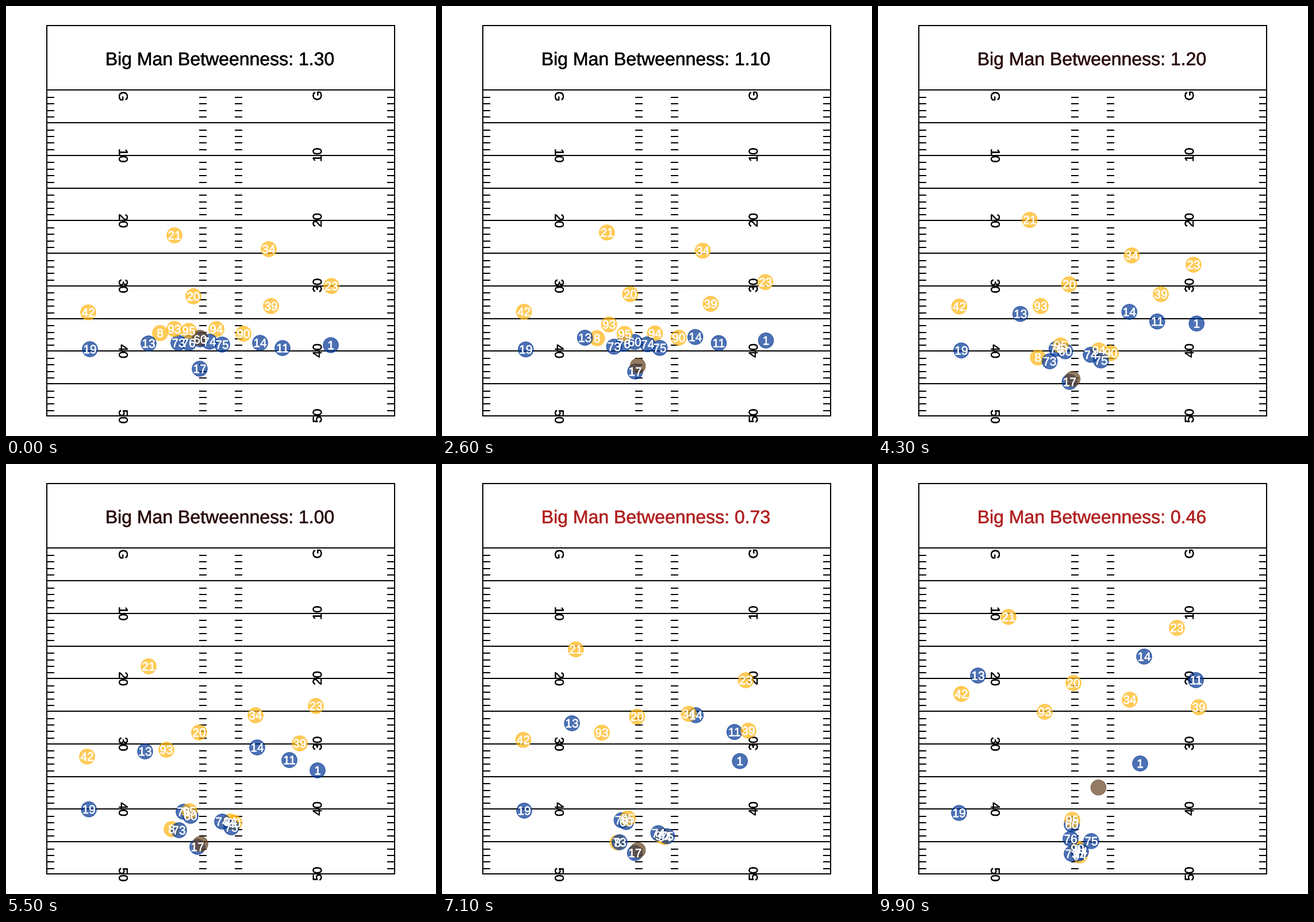
Write a matplotlib script that moves like this. It is 748x748 px and loops after 10 s.

```python
import numpy as np
import matplotlib.pyplot as plt
from matplotlib.animation import FuncAnimation
from matplotlib.patches import Circle, Rectangle
from matplotlib.patheffects import withStroke

SIZE, DPI, FRAMES = 748, 100, 100
PT = 72 / DPI
GOLD, BLUE, BROWN, RED = "#FFB612", "#003594", "#654321", "#B22222"
LEFT, RIGHT, TOP, BOTTOM = 71, 676, 34, 713
GOAL, YARD = 146.4, 11.35
SNAP, CATCH, MIDWAY, THROW = 16, 27, 55, 89

plt.rcParams["font.family"] = "Liberation Sans"
fig = plt.figure(figsize=(SIZE / DPI, SIZE / DPI), dpi=DPI, facecolor="white")
ax = fig.add_axes([0, 0, 1, 1])
ax.set_xlim(0, SIZE)
ax.set_ylim(SIZE, 0)
ax.axis("off")


def label(x, y, text, px, **style):
    return ax.text(x, y, text, fontsize=px * PT, ha="center", va="baseline",
                   rotation_mode="anchor",
                   path_effects=[withStroke(linewidth=0.5 * PT)], **style)


def draw_field():
    line = dict(colors="black", linewidth=2 * PT, snap=True, zorder=1)
    ax.add_patch(Rectangle((LEFT, TOP), RIGHT - LEFT, BOTTOM - TOP, fill=False,
                           ec="black", lw=2 * PT, snap=True, zorder=1))
    hashes = np.array([LEFT, 336, 398, RIGHT - 13])
    for yard in range(50):
        y = GOAL + yard * YARD
        if yard % 5 == 0:
            ax.hlines(y, LEFT, RIGHT, **line)
        else:
            ax.hlines([y + 1.2] * 4, hashes, hashes + 13, **line)
    for yard in range(0, 51, 10):
        text = str(yard) if yard else "G"
        y = GOAL + yard * YARD + (0 if yard else 10.5)
        label(196.5, y + 0.3, text, 22, rotation=270, zorder=2)
        label(549, y - 1, text, 22, rotation=90, zorder=2)


frames = np.arange(FRAMES)
since = np.maximum(frames - SNAP, 0)
# Ground covered since the snap: get up to speed, then run steadily
run = since - 14 * (1 - np.exp(-since / 14))
run = (run / run[-1])[:, None]


def route(start, end, via=None):
    """Curve from start to end that passes via at MIDWAY."""
    start, end = np.array(start, float), np.array(end, float)
    path = start + (end - start) * run
    if via:
        path += (via - path[MIDWAY]) * run * (1 - run) / (
            run[MIDWAY] * (1 - run[MIDWAY]))
    return path


movers = []


def add(name, color, path):
    z = 3 + 0.01 * len(movers)
    dot = ax.add_patch(Circle(path[0], 13.3, fc=color, ec=color, alpha=0.7,
                              lw=PT, zorder=z))
    text = label(*path[0], name, 21, color="white", zorder=z + 2)
    movers.append((dot, text, path))
    return path


def defend(number, *points):
    return add(str(number), GOLD, route(*points))


def attack(number, *points):
    return add(str(number), BLUE, route(*points))


def carry(passer):
    """Ball: snapped back, held beside the passer, then thrown."""
    centre, throw = np.array([337, 577]), np.array([3.5, -11.2])
    t = np.clip((frames - SNAP) / (CATCH - SNAP), 0, 1)[:, None]
    held = centre + (passer + [5, -5] - centre) * t
    flight = np.maximum(frames - THROW, 0)[:, None] * throw
    return np.where(flight, held[THROW] + flight, held)


draw_field()

# Pass rush
defend(8, (268, 569), (347, 671), (288, 635))
defend(94, (366, 562), (351, 681), (390, 622))
defend(90, (413, 570), (347, 669), (397, 624))

# Receivers
attack(19, (146, 597), (141, 607))
attack(13, (248, 587), (174, 368), (242, 500))
attack(14, (442, 586), (463, 335), (437, 493))
attack(11, (481, 595), (553, 376), (493, 515))
attack(1, (565, 590), (456, 521), (542, 533))

# Pocket
passer = attack(17, (337, 631), (350, 677), (333, 666))
attack(73, (300, 586), (337, 678), (301, 637))
attack(76, (318, 586), (335, 652), (309, 605))
attack(60, (338, 580), (337, 627), (321, 612))
attack(74, (354, 584), (353, 674), (376, 622))
attack(75, (376, 589), (371, 656), (392, 632))

# Cover
defend(95, (318, 565), (338, 619), (319, 604))
defend(93, (293, 562), (290, 431), (279, 497))
defend(21, (293, 399), (227, 266), (248, 352))
defend(34, (457, 423), (438, 410), (434, 437))
defend(23, (566, 487), (520, 285), (539, 421))
defend(20, (326, 505), (340, 381), (336, 467))
defend(39, (461, 522), (558, 423), (511, 486))
defend(42, (143, 533), (145, 400), (141, 509))

add("", BROWN, carry(passer))
title = label(371.7, 103, "", 32, zorder=2)


def score(frame):
    value = np.interp(frame, [0, 26, 43, MIDWAY, 71, 99],
                      [1.3, 1.1, 1.2, 1.0, 0.73, 0.46])
    return round(value, 1) if value >= 1 else value


def update(frame):
    value = score(frame)
    title.set_text(f"Big Man Betweenness: {value:.2f}")
    title.set_color(RED if value < 1 else
                    "#2A0A0A" if frame > 33 else "black")
    for dot, text, path in movers:
        x, y = path[frame]
        dot.center = x, y
        text.set_position((x, y + 7.3))
    return []


anim = FuncAnimation(fig, update, frames=FRAMES, interval=100, repeat=True,
                     repeat_delay=0)
plt.show()
```
